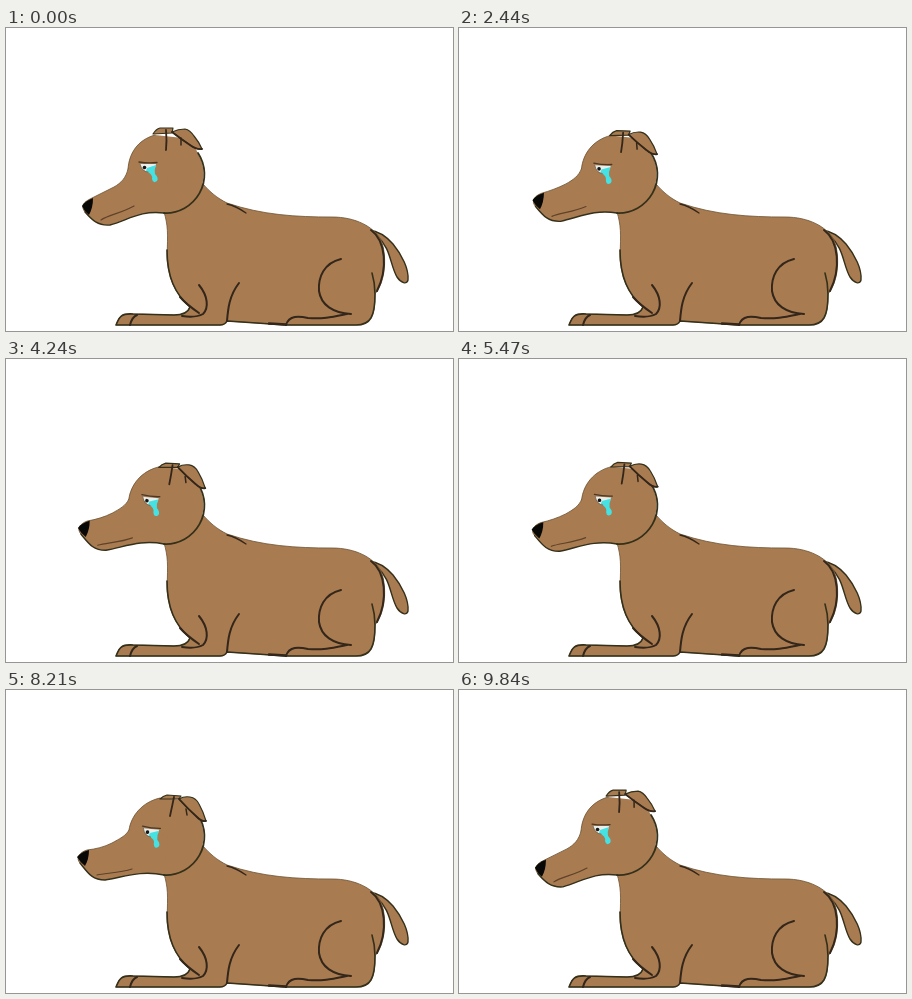
An HTML page with a canvas that plays this animation: 447x303 px, repeating every 9870 ms.

```html
<!DOCTYPE html>
<html lang="en">
<head>
<meta charset="utf-8">
<title>Sad dog</title>
<style>
html, body { margin: 0; width: 100%; height: 100%; overflow: hidden; background: #fff; }
canvas { display: block; }
</style>
</head>
<body>
<canvas id="stage" width="447" height="303"></canvas>
<script>
const ctx = document.getElementById('stage').getContext('2d');
const LOOP = 9870, NOD = LOOP / 3;
const FUR = '#a97b51', INK = '#33261a', EDGE = '#6b5433', RIM = '#34301a';

const fill = (path, color) => { ctx.fillStyle = color; ctx.fill(new Path2D(path)); };
const line = (path, width = 2, color = INK) => {
  ctx.lineWidth = width;
  ctx.strokeStyle = color;
  ctx.stroke(new Path2D(path));
};

// Blends two paths that share the same commands.
function morph(low, high, p) {
  const ends = high.match(/-?[\d.]+/g);
  let i = 0;
  return low.replace(/-?[\d.]+/g, n => +n + (ends[i++] - n) * p);
}

// Head lift: quick decelerating rise, then an even fall.
function lift(t) {
  const q = (t % NOD) / NOD * 2;
  return q < 1 ? 1 - (1 - q) ** 2 : 2 - q;
}

const TAIL = 'M363 202 C372 203 380 208 387 216 C396 227 403 241 402 252 C401 257 395 255 391 249 C384 237 385 220 371 208Z';
const TORSO = 'M158 184 C162 197 162 206 161 228 C162 250 169 266 184 279 C182 285 177 287 168 287 L127 286 ' +
  'C114 285 113 290 110 297 L214 297 Q219 297 221 293 L280 297 L350 297 C365 297 369 288 369 266 ' +
  'C380 253 381 227 375 212 C368 199 350 189 326 189 C290 189 256 187 221 175 C211 170 204 164 197 156 L162 150Z';
const RIMS = [
  'M161 222 C161 249 169 266 184 279 C182 285 177 287 168 287 L127 286 C114 285 113 290 110 297 L214 297 Q219 297 221 293 L280 297',
  'M280 297 L350 297 C365 297 369 288 369 266 Q369 255 366 245'
];
const CREASES = [
  'M174 269 Q180 276 193 285',
  'M193 257 C202 268 203 280 197 286 Q190 290 176 288',
  'M131 287 Q126 289 124 297',
  'M233 255 C223 268 222 281 221 293',
  'M335 231 C318 235 312 249 313 263 C315 277 327 285 345 286',
  'M280 297 C283 287 293 288 302 290 C318 291 326 289 341 286',
  'M365 202 C380 213 382 241 371 263'
];

function drawBody() {
  fill(TAIL, FUR);
  line(TAIL, 1.4, RIM);
  fill(TORSO, FUR);
  line(TORSO, 0.8, EDGE);
  RIMS.forEach(r => line(r, 1.6, RIM));
  CREASES.forEach(c => line(c));
  line('M263 295.5 L280 296.5', 2.4);
  line('M221 176 Q230 178 240 185', 1.3);
}

function drawHead(p) {
  const dome = morph('M122 141 C123 126 131 112 149 107', 'M123 140 C125 126 136 112 154 108', p);
  fill(dome + ' L186 111 L192 126 A39 39 0 0 1 159 185 L122 150Z', FUR);
  line(dome, 0.8, EDGE);

  const bridge = morph('M122 141 C120 150 115 155 108 159 C100 163 92 167 84 171 C78 174 74 178 79 184',
    'M123 140 C120 146 113 149 106 153 C98 157 90 159 81 160 C74 162 69 168 74 173', p);
  const jaw = morph('79 184 C86 192 92 198 104 197 C122 192 135 182 158 185',
    '74 173 C82 183 86 190 99 190 C118 187 135 180 158 185', p);
  fill(bridge + ' L' + jaw + ' L162 146Z', FUR);
  line(bridge, 0.8, EDGE);
  line('M' + jaw, 1.4, RIM);
  line('M158 185 A38.7 38.7 0 0 0 192 125', 1.8, RIM);
  fill(morph('M87 170 Q79 173 76 178 Q78 183 83 187 Q87 180 87 170Z',
    'M83 160 Q75 162 71 167 Q74 172 79 176 Q83 169 83 160Z', p), '#080806');
  line(morph('M95 192 C102 187 116 185 128 178', 'M91 185 C100 183 114 183 126 179', p), 1.2, '#5e4229');
}

function drawEar(p) {
  const tuft = morph('M147 106 Q150 101 154 100 L167 100 L166 105Z',
    'M154 109 Q157 106 161 105 L175 106 L173 109Z', p);
  const flap = morph('M166 104 Q172 101 179 101 Q184 102 188 108 Q193 114 196 121 Q191 122 184 117 Q175 111 166 104Z',
    'M173 109 Q178 106 184 107 Q190 108 193 114 Q197 121 200 131 Q196 132 191 127 Q182 119 173 109Z', p);
  const fold = morph('M166 104 Q175 111 184 117 Q191 122 196 121',
    'M173 109 Q182 119 191 127 Q196 132 200 131', p);
  for (const part of [tuft, flap]) {
    fill(part, FUR);
    line(part, 1.2, RIM);
  }
  line(fold, 1.8);
  line(morph('M160 102 Q161 113 160 122', 'M168 107 Q166 117 164 126', p), 1.8);
  line(morph('M175 110 L175 117', 'M180 119 L181 125', p), 1.5);
}

function drawEye(p) {
  ctx.save();
  ctx.translate(142 + 3 * p, 139 + 3 * p);
  ctx.rotate(0.1 * p);
  fill('M-8 -3 L8 -3 Q7 3 2 5 Q-6 5 -8 -3Z', '#e9eeea');
  fill('M-1 1 L8 -2 Q6 3 7 7 Q11 11 9 14 Q5 17 4 12 Q5 7 -2 4Z', '#45e2e4');
  ctx.beginPath();
  ctx.arc(-3.5, 0.5, 1.8, 0, Math.PI * 2);
  ctx.fillStyle = '#151515';
  ctx.fill();
  line('M-8 -3 Q-6 5 0 5', 0.7, '#6b5a46');
  line('M-9 -5 Q0 -3.5 9 -4.5', 1.3, '#4a3826');
  ctx.restore();
}

function render(now) {
  const p = lift(now % LOOP);
  ctx.fillStyle = '#fff';
  ctx.fillRect(0, 0, 447, 303);
  ctx.lineCap = ctx.lineJoin = 'round';
  drawBody();
  drawHead(p);
  drawEar(p);
  drawEye(p);
}

let start;
function tick(now) {
  start ??= now;
  render(now - start);
  requestAnimationFrame(tick);
}
render(0);
requestAnimationFrame(tick);
</script>
</body>
</html>
```
